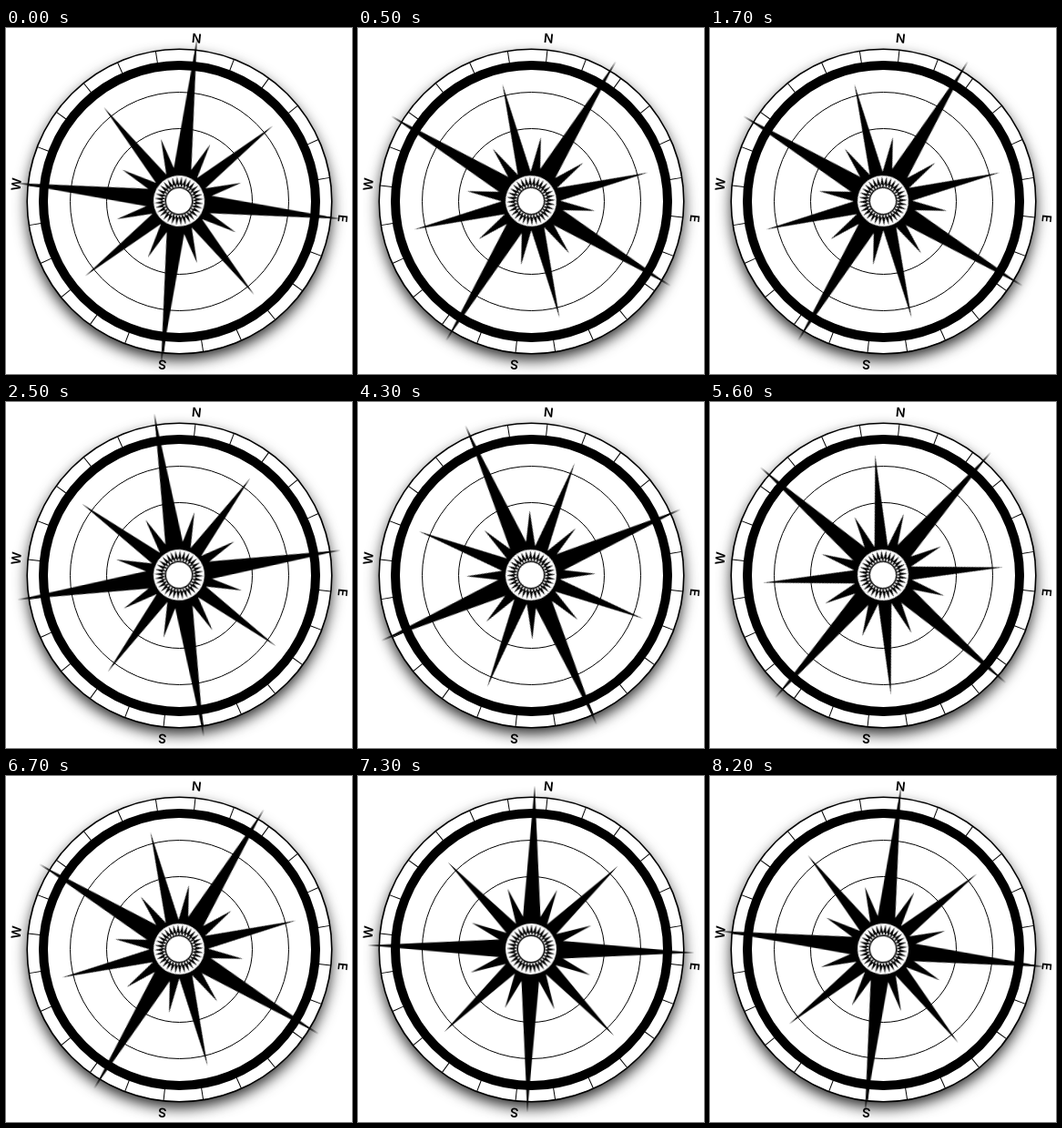
An HTML page that plays this animation: 380x380 px, repeating every 8300 ms.

```html
<!DOCTYPE html>
<html lang="en">
<head>
<meta charset="utf-8">
<title>Compass</title>
<style>
  html, body { margin: 0; width: 100%; height: 100%; overflow: hidden; background: #fff; }
  svg { display: block; width: 100vw; height: 100vh; }
  .line { fill: none; stroke: #000; }
  .face { fill: #fff; filter: drop-shadow(0 7px 8px rgba(0, 0, 0, .85)); }
  text { font: 600 14px Inter, Arial, sans-serif; text-anchor: middle; }

  /* The needle turns in hard 5 degree ticks, ten per second. */
  #rose { animation: swing 8.3s -5ms infinite; }
  @keyframes swing {
    0%       { transform: rotate(6deg); }
    1.2048%  { transform: rotate(6deg); animation-timing-function: steps(6, start); }
    8.4337%  { transform: rotate(36deg); }
    20.4819% { transform: rotate(36deg); animation-timing-function: steps(13, start); }
    36.1446% { transform: rotate(-29deg); }
    51.8072% { transform: rotate(-29deg); animation-timing-function: steps(14, start); }
    68.6747% { transform: rotate(41deg); }
    79.5181% { transform: rotate(41deg); animation-timing-function: steps(12, start); }
    93.9759% { transform: rotate(-19deg); animation-timing-function: steps(5, start); }
    100%     { transform: rotate(6deg); }
  }
</style>
</head>
<body>
<svg viewBox="0 0 380 380">
  <g transform="translate(190.5 190.5)">
    <circle class="face" r="167"/>
    <circle class="line" r="167.3" stroke-width="1.6"/>
    <circle class="line" r="149.5" stroke-width="10"/>
    <circle class="line" r="120"/>
    <circle class="line" r="80"/>
    <g transform="rotate(6)">
      <path id="ticks" class="line"/>
      <text y="-175.2">N</text>
      <text y="-175.2" transform="rotate(90)">E</text>
      <text y="-175.2" transform="rotate(180)">S</text>
      <text y="-175.2" transform="rotate(270)">W</text>
    </g>
  </g>
  <g transform="translate(190 190) rotate(.3)">
    <g id="rose">
      <path id="points"/>
      <circle r="28" fill="#fff"/>
      <path id="rays"/>
      <circle class="line" r="17.2" stroke-width="3" pathLength="64" stroke-dasharray="1"/>
      <circle class="line" r="14.8" stroke-width="1.5"/>
    </g>
  </g>
</svg>
<script>
  const polar = (r, deg) => {
    const a = deg * Math.PI / 180;
    return (r * Math.sin(a)).toFixed(2) + ' ' + (-r * Math.cos(a)).toFixed(2);
  };
  const around = (count, first, draw) =>
    Array.from({ length: count }, (_, i) => draw(first + i * 360 / count)).join('');
  // A triangle from radius `base` out to `tip`, `half` wide on each side.
  const spike = (base, tip, half) => deg => {
    const r = Math.hypot(base, half);
    const spread = Math.atan2(half, base) * 180 / Math.PI;
    return `M${polar(r, deg - spread)}L${polar(tip, deg)}L${polar(r, deg + spread)}Z`;
  };
  const draw = (id, d) => document.getElementById(id).setAttribute('d', d);

  draw('ticks', around(24, 0, a => `M${polar(154, a)}L${polar(167, a)}`));
  draw('points',
    around(4, 0, spike(0, 179.5, 12)) +
    around(4, 45, spike(0, 132, 9.5)) +
    around(8, 22.5, spike(0, 71, 9.5)));
  draw('rays', around(32, 0, spike(18, 27, 1.8)));
</script>
</body>
</html>
```
